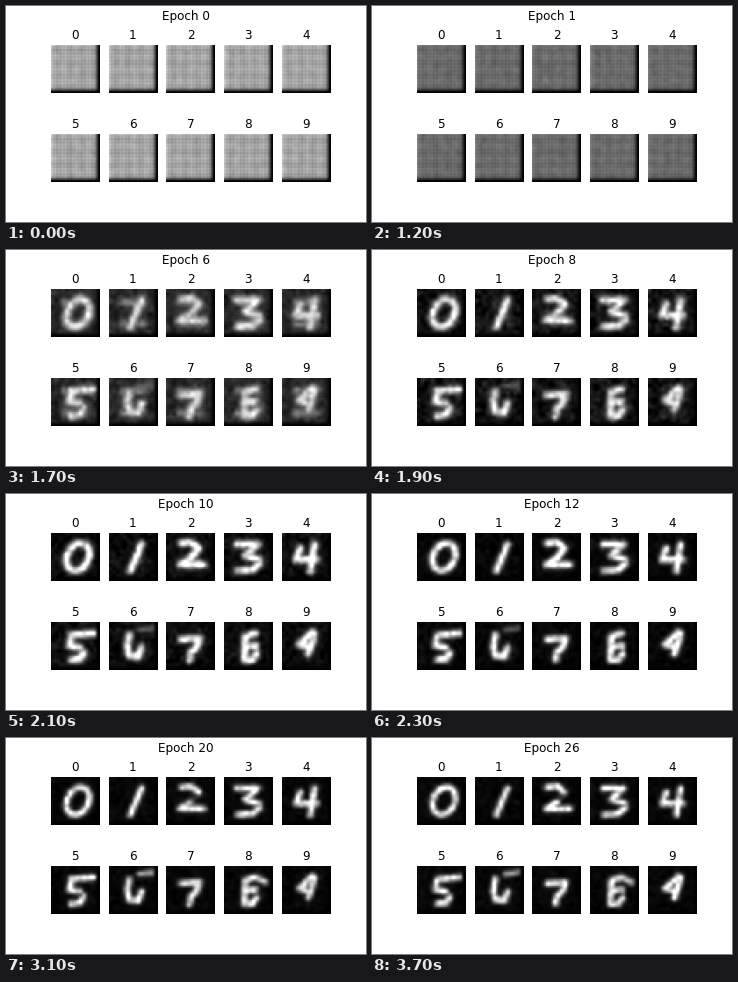
Animation, 360 px wide and 216 px high, one loop 4800 ms. Source, as a matplotlib script:

```python
import numpy as np
import matplotlib.pyplot as plt
from matplotlib.animation import FuncAnimation

N, COARSE, SIDE = 28, 14, 48.1
INTERVAL, FRAMES, HOLD, LAST = 100, 48, 12, 26
px = (np.arange(COARSE) + 0.5) * SIDE / COARSE
X, Y = np.meshgrid(px, px)


def distance(points):
    """Distance of every coarse cell to a polyline in tile pixels."""
    best = np.full(X.shape, 1e3)
    for (ax, ay), (bx, by) in zip(points, points[1:]):
        dx, dy = bx - ax, by - ay
        t = np.clip(((X - ax) * dx + (Y - ay) * dy) / (dx * dx + dy * dy), 0, 1)
        best = np.minimum(best, np.hypot(X - ax - t * dx, Y - ay - t * dy))
    return best


def stroke(*points, early=1.0, late=1.0):
    """A pen stroke whose brightness drifts from early to late."""
    return distance(points), early, late


def ring(cx, cy, rx, ry, slant):
    angles = np.linspace(0, 2 * np.pi, 25)
    return stroke(*[(cx + rx * np.cos(a) - slant * ry * np.sin(a), cy + ry * np.sin(a))
                    for a in angles])


DIGITS = [
    [ring(26.5, 24.5, 11, 13.5, 0.2)],
    [stroke((32, 12), (21, 38))],
    [stroke((15, 11), (25, 10), (32, 16)), stroke((32, 16), (24, 26), late=0.2),
     stroke((24, 26), (14, 32), (37, 32))],
    [stroke((13, 12), (33, 12), (21, 23), (34, 27)), stroke((35, 31), (28, 37), (14, 38))],
    [stroke((18, 16), (14, 27), (34, 27)), stroke((32, 12), (28, 38))],
    [stroke((42, 12), (20, 14), (18, 24), (28, 26)), stroke((32, 31), (29, 37), (20, 38))],
    [stroke((20, 14), (18, 25), (20, 34), (29, 35), (32, 26)),
     stroke((30, 9), (43, 7), early=0.3, late=0.6)],
    [stroke((15, 18), (33, 17), (30, 26), (25, 30), (23, 38))],
    [stroke((31, 12), (21, 15), (20, 38), (28, 38), (32, 32)), stroke((21, 25), (31, 24)),
     stroke((31, 12), (41, 17), early=0, late=0.8)],
    [stroke((30, 11), (17, 23), (25, 25)), stroke((32, 12), (30, 20), (26, 32))],
]
BARS = np.minimum(distance([(14, 14), (33, 14)]), distance([(14, 35), (33, 35)]))


def blur(a):
    for axis in (0, 1):
        pad = np.pad(a, [(1, 1) if i == axis else (0, 0) for i in (0, 1)], mode="edge")
        a = (np.roll(pad, 1, axis) + 2 * pad + np.roll(pad, -1, axis)) / 4
        a = np.take(a, range(1, N + 1), axis)
    return a


def enlarge(a):
    return blur(np.kron(a, np.ones((2, 2))))


def drifting_noise(seed, epoch):
    a, b = np.random.default_rng(seed).normal(size=(2, COARSE, COARSE))
    return a * np.cos(epoch / 2) + b * np.sin(epoch / 2)


# Woven pattern: fine alternation over broad bands, brighter at the first lines.
i = np.arange(N)
bands = 0.35 * np.cos(np.pi * i) + 0.4 * np.cos(2 * np.pi * i / 7) + np.exp(-i)
weave = bands[None, :] + bands[:, None]
fade = 1 - np.exp(-((N - 1 - i) / 1.5) ** 2)
edge = np.outer(fade, fade)


def bump(epoch, centre, width):
    return np.exp(-((epoch - centre) / width) ** 2)


def render(epoch, digit):
    level = np.interp(epoch, [0, 1, 5, 8, 12], [0.64, 0.41, 0.19, 0.07, 0.025])
    growth = np.clip((epoch - 1) / 9, 0, 1) ** 0.6
    radius = 2.7 + 4 * np.exp(-epoch / 5)
    age = np.clip((epoch - 12) / 8, 0, 1)

    ink = 0.4 * bump(epoch, 5, 2) * np.exp(-(BARS / radius) ** 2)
    for d, early, late in DIGITS[digit]:
        weight = growth * (early + (late - early) * age)
        ink = np.maximum(ink, weight * np.exp(-(d / radius) ** 2))
    ink = ink * (1 + 0.14 * drifting_noise(digit, epoch))
    speckle = (0.02 + 0.04 * bump(epoch, 8, 3)) * drifting_noise(50 + digit, epoch)

    image = level * (1 + 0.1 * weave) + enlarge(1.15 * ink + speckle)
    return np.clip(image * edge, 0, 1)


fig = plt.figure(figsize=(5, 3), dpi=72, facecolor="white")
plt.rcParams["font.family"] = "DejaVu Sans"
heading = fig.suptitle("Epoch 0", fontsize=12)
images = []
for digit in range(10):
    row, col = divmod(digit, 5)
    top = 39.1 + 88.7 * row
    ax = fig.add_axes([(45 + 57.72 * col) / 360, 1 - (top + SIDE) / 216,
                       SIDE / 360, SIDE / 216])
    ax.axis("off")
    ax.set_title(str(digit), fontsize=12)
    images.append(ax.imshow(render(0, digit), cmap="gray", vmin=0, vmax=1, aspect="auto"))


def update(frame):
    epoch = min(max(frame - HOLD + 1, 0), LAST)
    heading.set_text(f"Epoch {epoch}")
    for digit, image in enumerate(images):
        image.set_data(render(epoch, digit))
    return [heading, *images]


anim = FuncAnimation(fig, update, frames=FRAMES, interval=INTERVAL, repeat=True,
                     repeat_delay=0, blit=False)
plt.show()
```
